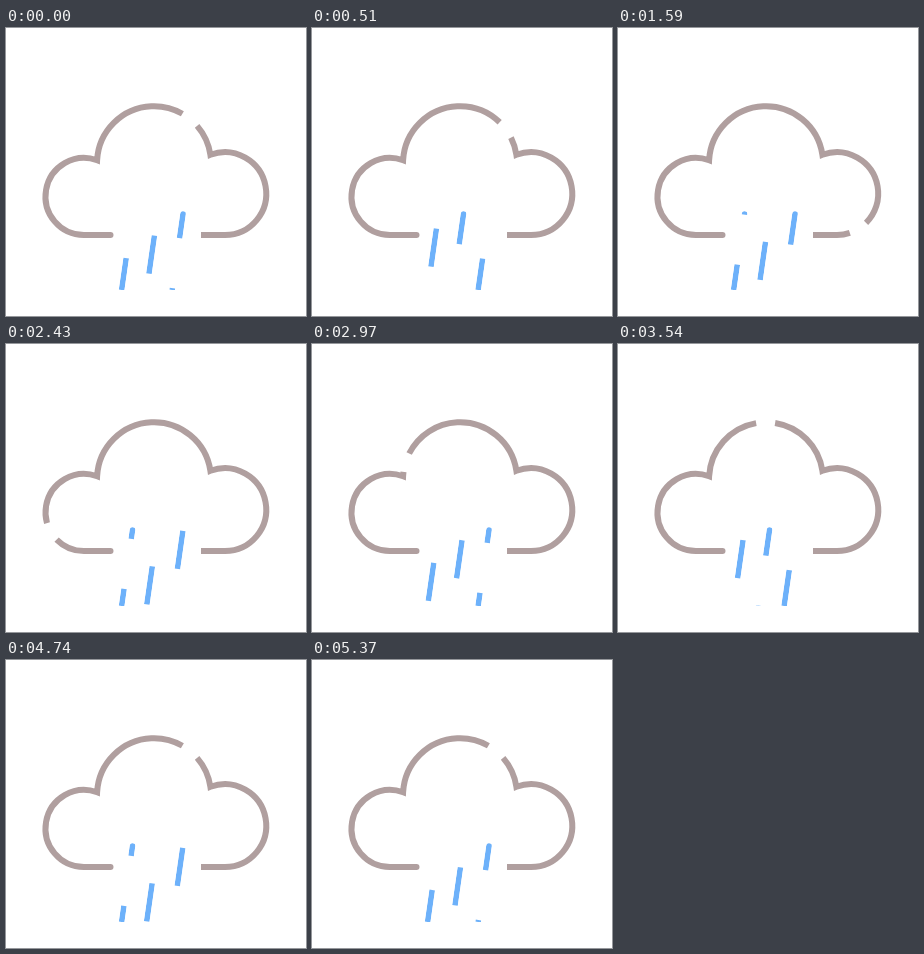
An HTML page without scripts that plays this animation: 300 px wide and 288 px high, repeating every 5.4 s.

```html
<!DOCTYPE html>
<html lang="en">
<head>
<meta charset="utf-8">
<title>Rain cloud</title>
<style>
  html, body { margin: 0; width: 100%; height: 100%; overflow: hidden; background: #fff; }
  svg { display: block; width: 300px; height: 288px; fill: none; }

  .cloud {
    stroke: #b09f9f;
    stroke-width: 6;
    stroke-dasharray: 566.9 19.1;
    animation: lap 5.4s infinite;
  }
  /* one lap of the gap, then a rest */
  @keyframes lap {
    0% { stroke-dashoffset: 245.2px; animation-timing-function: cubic-bezier(.444, 0, .484, 1); }
    83.333%, 100% { stroke-dashoffset: -340.8px; }
  }

  .rain path {
    stroke: #6db1fa;
    stroke-width: 5.6;
    stroke-dasharray: 38.4 50.5;
    stroke-dashoffset: var(--o);
    animation: fall 5.4s linear infinite;
  }
  /* seven dash periods per loop */
  @keyframes fall {
    0% { stroke-dashoffset: var(--o); }
    99.444%, 100% { stroke-dashoffset: calc(var(--o) - 622.3px); }
  }
</style>
</head>
<body>
<svg viewBox="0 0 300 288">
  <defs>
    <path id="lane" d="M0 186.2L-10.9 262"/>
    <mask id="lanes" maskUnits="userSpaceOnUse" x="100" y="180" width="90" height="82.3">
      <g stroke="#fff" stroke-width="5.8" stroke-linecap="round">
        <use href="#lane" x="126.5"/>
        <use href="#lane" x="151.5"/>
        <use href="#lane" x="177"/>
      </g>
    </mask>
  </defs>

  <path class="cloud" pathLength="586" d="M150 207H78.2A38.5 38.5 0 1 1 91.1 132.3A57 57 0 0 1 204.4 126.8A41.4 41.4 0 1 1 219 207Z"/>
  <!-- opening under the cloud -->
  <path fill="#fff" d="M195 203H104.5v1a3 3 0 0 1 0 6v1H195z"/>

  <g class="rain" mask="url(#lanes)">
    <path style="--o:-47.3px" d="M126.9 183.2L115.6 262"/>
    <path style="--o:-24.5px" d="M151.9 183.2L140.6 262"/>
    <path style="--o:11.3px" d="M177.4 183.2L166.1 262"/>
  </g>
</svg>
</body>
</html>
```
